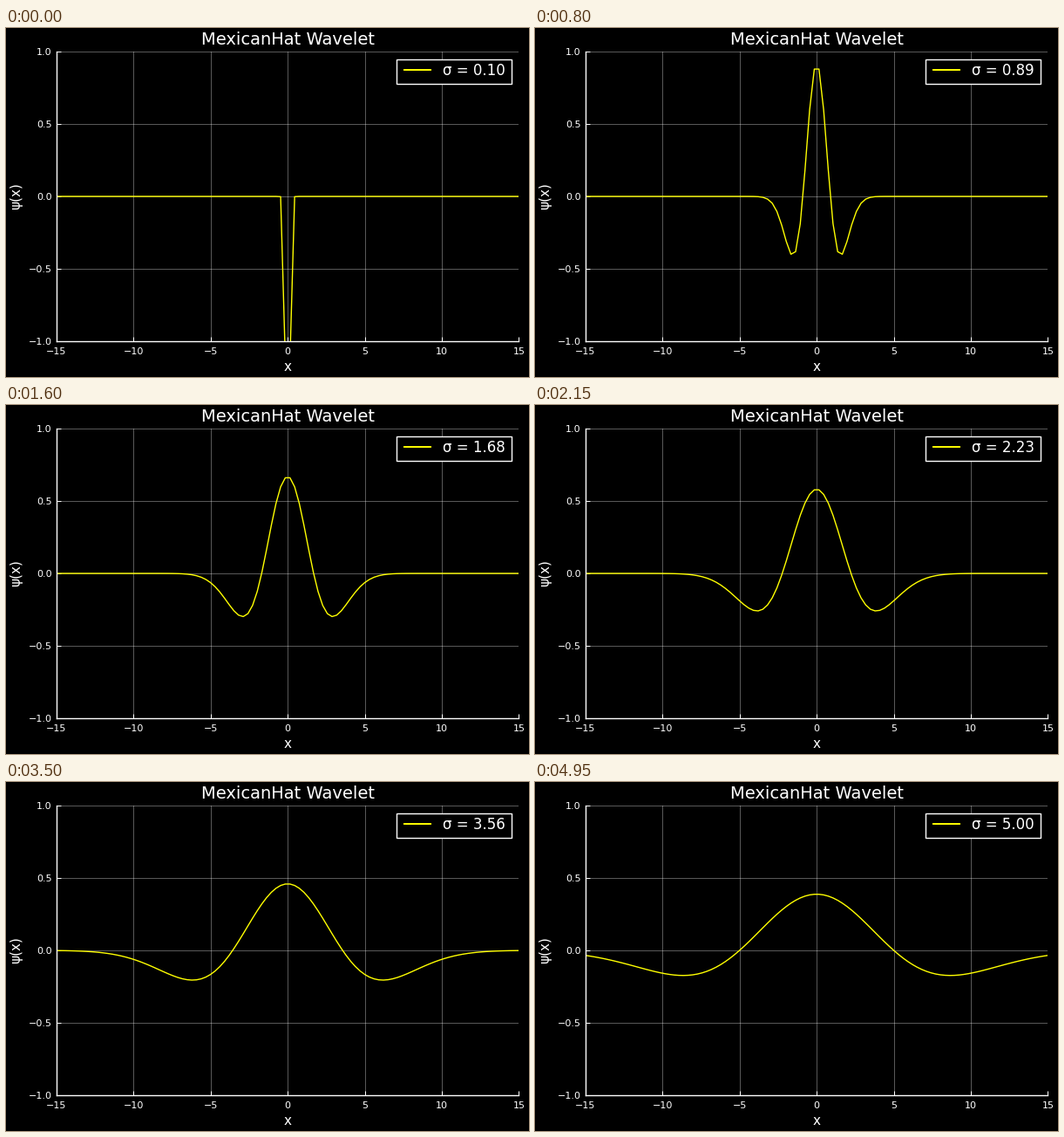
These frames come from a looping animation (600 px wide and 400 px high, 5000 ms). A matplotlib script:

```python
import numpy as np
import matplotlib.pyplot as plt
from matplotlib.animation import FuncAnimation
from matplotlib.patches import Rectangle

W, H, DPI = 600, 400, 100
FRAMES, INTERVAL = 100, 50
LEFT, RIGHT, TOP, BOTTOM = 57.7, 588.5, 27, 359

plt.rcParams.update({
    "font.family": "DejaVu Sans",
    "text.color": "white",
    "axes.labelcolor": "white",
    "axes.edgecolor": "white",
    "xtick.color": "white",
    "ytick.color": "white",
})

x = np.linspace(-15, 15, 100)
sigmas = np.linspace(0.1, 5, FRAMES)


def wavelet(x, s):
    u = (x / s) ** 2
    return 2 / (np.sqrt(3 * s) * np.pi ** 0.25) * (1 - u) * np.exp(-u / 2)


fig = plt.figure(figsize=(W / DPI, H / DPI), dpi=DPI, facecolor="black")
ax = fig.add_axes([LEFT / W, 1 - BOTTOM / H, (RIGHT - LEFT) / W, (BOTTOM - TOP) / H],
                  facecolor="black")
ax.set(xlim=(-15, 15), ylim=(-1, 1),
       xticks=np.arange(-15, 16, 5), yticks=np.arange(-1, 1.1, 0.5))
ax.set_xlabel("x", fontsize=11, labelpad=3)
ax.set_ylabel("ψ(x)", fontsize=11, labelpad=5)
ax.tick_params(direction="in", labelsize=8, width=0.72)
ax.tick_params(axis="x", pad=5.3)
ax.set_axisbelow(True)
ax.grid(color="white", alpha=0.5, linewidth=0.5)
ax.spines[["top", "right"]].set_visible(False)
ax.spines[["left", "bottom"]].set_linewidth(1)
curve, = ax.plot(x, wavelet(x, sigmas[0]), color="yellow", linewidth=1)

# Title and legend, laid out in stage pixels
stage = fig.add_axes([0, 0, 1, 1])
stage.set(xlim=(0, W), ylim=(H, 0))
stage.axis("off")
stage.text(323.4, 19.17, "MexicanHat Wavelet", fontsize=14, ha="center")
stage.add_patch(Rectangle((448, 36), 132, 28, facecolor="black", edgecolor="white",
                          linewidth=1))
stage.plot([456, 488], [48, 48], color="yellow", linewidth=1.44, solid_capstyle="butt")
caption = stage.text(501.3, 54, "", fontsize=12)


def draw(i):
    s = sigmas[i]
    curve.set_ydata(wavelet(x, s))
    caption.set_text(f"σ = {s:.2f}")
    return curve, caption


anim = FuncAnimation(fig, draw, frames=FRAMES, interval=INTERVAL, repeat=True)
plt.show()
```
